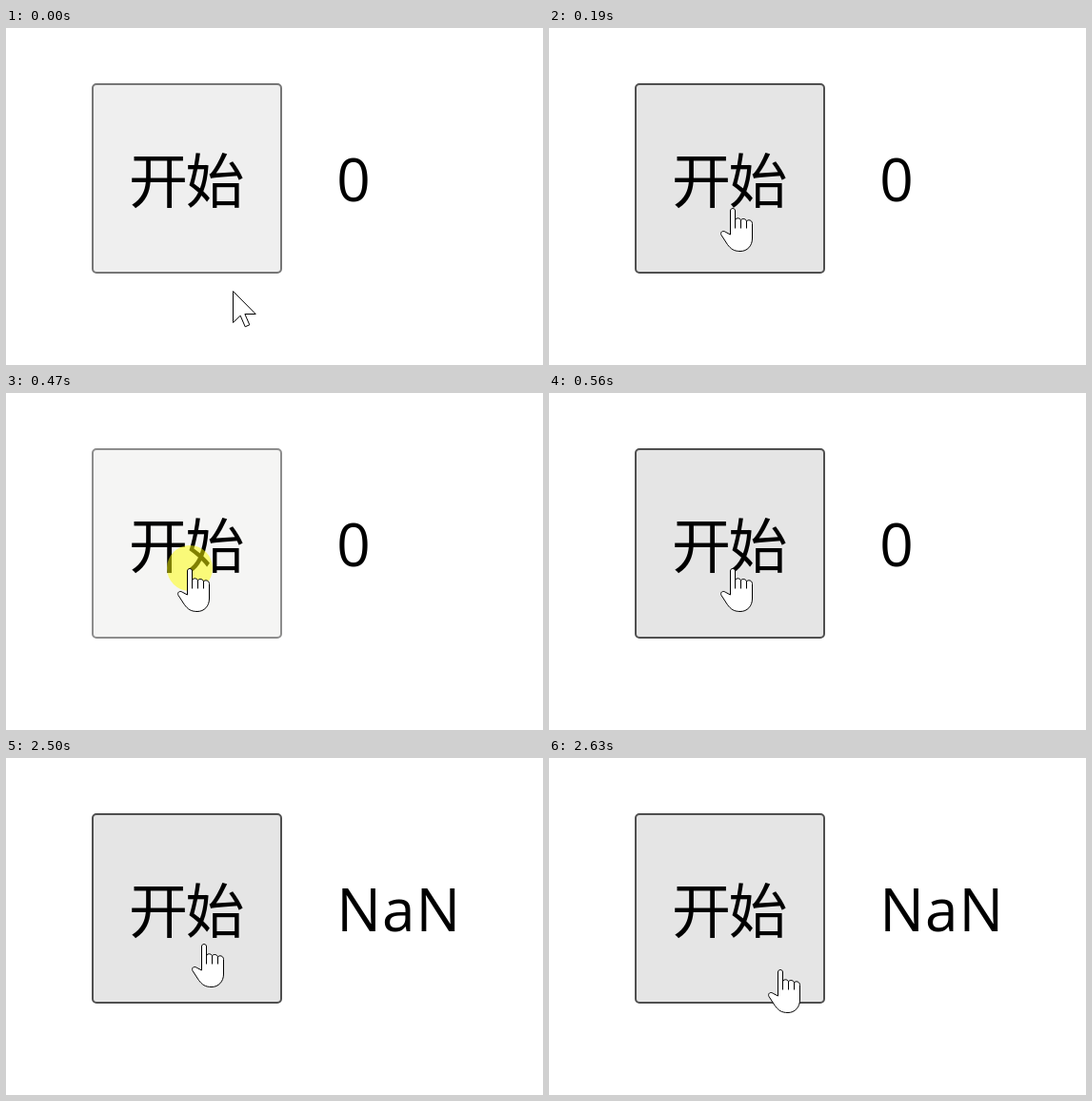
Recreate the animation shown at these times as an HTML page with a canvas. Size 564x354 px, loop 3.03 s.

```html
<!DOCTYPE html>
<html lang="zh">
<head>
<meta charset="utf-8">
<style>
  html, body { margin: 0; width: 100%; height: 100%; overflow: hidden; background: #fff; }
  canvas { display: block; }
</style>
</head>
<body>
<canvas id="stage" width="564" height="354"></canvas>
<script>
const ctx = document.getElementById('stage').getContext('2d');
const LOOP = 3030;

// [start ms, pointer x, pointer y]
const moves = [
  [0, 238, 276], [50, 234, 268], [90, 221, 244], [120, 208, 220],
  [150, 199, 202], [190, 193, 189], [240, 193, 186], [270, 193, 184],
  [2500, 208, 195], [2550, 223, 206], [2590, 235, 215], [2630, 243, 222]
];

const looks = {
  idle: ['#efefef', '#767676'],
  hover: ['#e5e5e5', '#4f4f4f'],
  active: ['#f5f5f4', '#8d8d8d']
};

const arrow = new Path2D('M.5 .5V33.5L8.2 26.2L13.2 37.8L17.8 35.8L12.9 24.5H24.2Z');
const hand = new Path2D(
  'M-2.5 28V3C-2.5 -.3 2.5 -.3 2.5 3V13' +
  'C2.5 10 8.5 10 8.5 13.5C8.5 10.7 14.5 10.7 14.5 14.5' +
  'C14.5 12 20.5 12 20.5 16.5V32C20.5 40 15 45.5 8 45.5' +
  'C1 45.5 -2 43 -5.5 38.5L-12 28.5C-13.5 25.5 -10.5 23.2 -7.8 25.2Z');
const knuckles = new Path2D('M2.5 12V21.5M8.5 13V21.5M14.5 14V21.5');

function drawButton([fill, edge]) {
  ctx.beginPath();
  ctx.roundRect(91, 59, 198, 198, 4);
  ctx.fillStyle = fill;
  ctx.fill();
  ctx.strokeStyle = edge;
  ctx.lineWidth = 2;
  ctx.stroke();
}

function drawText(text, x, y, font, align, spacing = '0px') {
  ctx.font = font;
  ctx.textAlign = align;
  ctx.letterSpacing = spacing;
  ctx.fillStyle = '#000';
  ctx.fillText(text, x, y);
}

function drawPointer(x, y, isHand) {
  const shape = isHand ? hand : arrow;
  ctx.save();
  ctx.translate(x, y);
  ctx.fillStyle = '#fff';
  ctx.strokeStyle = '#000';
  ctx.lineWidth = 1;
  ctx.fill(shape);
  ctx.stroke(shape);
  if (isHand) ctx.stroke(knuckles);
  ctx.restore();
}

function draw(t) {
  const [, x, y] = moves.findLast(m => m[0] <= t);
  const over = y < 258;
  const pressed = t >= 470 && t < 560;

  ctx.fillStyle = '#fff';
  ctx.fillRect(0, 0, 564, 354);
  drawButton(pressed ? looks.active : over ? looks.hover : looks.idle);

  const cjk = '300 62px "Noto Sans CJK SC", "Noto Sans CJK", sans-serif';
  drawText('开', 160, 184, cjk, 'center');
  drawText('始', 219.5, 184, cjk, 'center');
  const latin = '62px "Open Sans", "Noto Sans", sans-serif';
  drawText(t < 1580 ? '0' : 'NaN', 347.3, 182, latin, 'left', '1px');

  if (pressed) {
    ctx.beginPath();
    ctx.arc(x, y, 24, 0, Math.PI * 2);
    ctx.fillStyle = 'rgba(255, 255, 0, .5)';
    ctx.fill();
  }
  drawPointer(x, y, over);
}

function tick() {
  draw(performance.now() % LOOP);
  requestAnimationFrame(tick);
}
tick();
</script>
</body>
</html>
```
